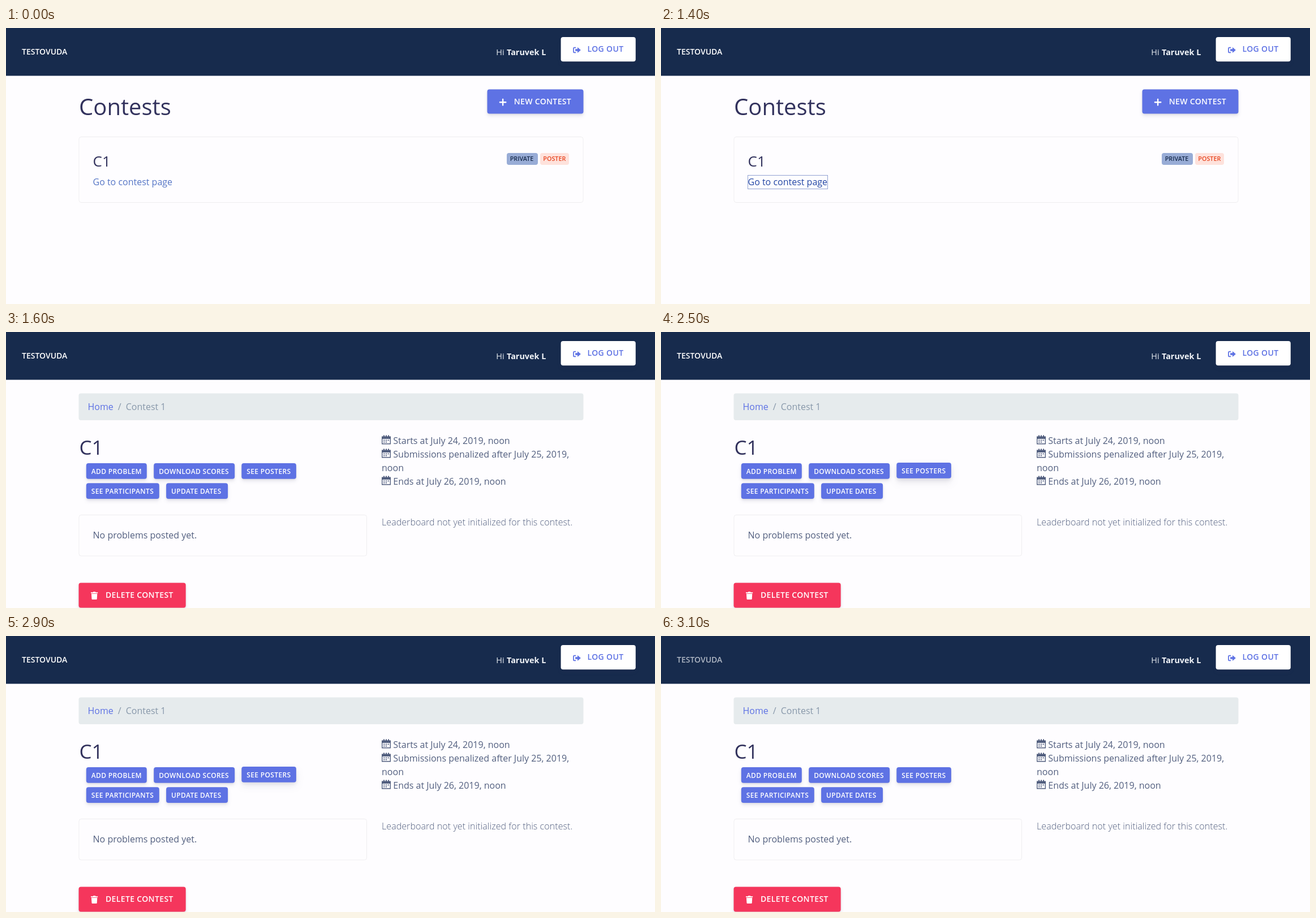
An HTML page for the animation above (4 s loop, 1147 px wide and 488 px high).

```html
<!DOCTYPE html>
<html lang="en">
<head>
<meta charset="utf-8">
<title>Contests</title>
<style>
  html, body { margin: 0; width: 100%; height: 100%; overflow: hidden; background: #fefdff; }
  svg { display: block; width: 1147px; height: 488px; }
  text { font-family: "Open Sans", sans-serif; white-space: pre; }
  .button { filter: drop-shadow(0 4px 3px rgba(50, 50, 93, .11)) drop-shadow(0 1px 1.5px rgba(0, 0, 0, .08)); }
  .label { font-weight: 600; letter-spacing: .35px; }
  .light { font-weight: 300; letter-spacing: .07px; }
</style>
</head>
<body>
<svg id="stage" viewBox="0 0 1147 488"></svg>
<script>
const INK = '#32325d', BODY = '#525f7f', BLUE = '#5e72e4', MUTED = '#8898aa', RED = '#f5365c';

const box = (x, y, w, h, fill, attrs = '') =>
  `<rect x="${x}" y="${y}" width="${w}" height="${h}" rx="4" fill="${fill}" ${attrs}/>`;

const card = (x, y, w, h) =>
  box(x + .5, y + .5, w - 1, h - 1, 'none', 'stroke="#000" stroke-opacity=".06"');

const text = (x, y, size, fill, content, attrs = '') =>
  `<text x="${x}" y="${y}" font-size="${size}" fill="${fill}" ${attrs}>${content}</text>`;

const bold = 'font-weight="600"';

const bigButton = (x, y, w, h, label, labelX, baseline, color, fill, icon) =>
  box(x, y, w, h, fill, 'class="button"') +
  text(labelX, baseline, 14, color, label, 'class="label"') +
  `<g transform="translate(${x + 21.5} ${baseline - 10})" color="${color}" fill="${color}">${icon}</g>`;

const smallButton = (x, y, w, label, id = '') =>
  `<g id="${id}">${box(x, y, w, 27.8, BLUE, 'class="button"')}
  ${text(x + 9, Math.floor(y) + 18.5, 12, '#fff', label, 'class="label"')}</g>`;

const calendar = y => `<g transform="translate(664 ${y})" fill="${BODY}">
  <path d="M0 2H3V0H5V2H7V0H9V2H11V0H13V2H16V16H0ZM1.4 6.4V14.6H14.6V6.4Z" fill-rule="evenodd"/>
  <path d="M3.2 8.8H12.8M3.2 12.2H9" stroke="${BODY}" stroke-width="1.8" stroke-dasharray="2.2 1.5"/></g>`;

const exitIcon = `<path d="M4 5.2H7.9V2.1L13.8 7 7.9 11.9V8.8H4Z"/>
  <path d="M5.2 2.6H2.6Q.9 2.6.9 4.3V9.7Q.9 11.4 2.6 11.4H5.2" fill="none" stroke="currentColor" stroke-width="1.75"/>`;
const plusIcon = '<path d="M6.1 1V11.4M.9 6.2H11.3" stroke="currentColor" stroke-width="2.4" stroke-linecap="round"/>';
const trashIcon = '<path d="M0 .2H3.6L4.3-.7H7.9L8.6.2H12.2V2H0ZM.9 2.8H11.3L10.7 12Q10.6 13 9.6 13H2.6Q1.6 13 1.5 12Z"/>';

const header =
  '<rect width="1147" height="84.5" fill="#172b4d"/>' +
  bigButton(980.6, 16, 132.2, 43.3, 'LOG OUT', 1027.5, 42, BLUE, '#fff', exitIcon) +
  text(28, 47, 14, '#fff', 'TESTOVUDA', bold + ' id="brand"') +
  text(866.3, 48, 14.4, '#e6eaf0', 'Hi') +
  text(885, 48, 14.4, '#f1f4f8', 'Taruvek L', 'font-weight="700"');

const contestList =
  text(129, 154, 40, INK, 'Contests') +
  bigButton(850.5, 108.5, 170, 43, 'NEW CONTEST', 897.7, 135, '#fff', BLUE, plusIcon) +
  card(128.5, 192, 892, 117) +
  text(153.5, 245, 26, INK, 'C1') +
  text(153.5, 278, 16, '', 'Go to contest page', 'id="link"') +
  '<rect id="outline" x="153.5" y="260.5" width="141" height="24" fill="none" stroke="#2447a5" stroke-dasharray="1"/>' +
  box(885, 221, 55, 21, '#98acd6') +
  text(890.7, 235, 10.8, '#172b4d', 'PRIVATE', bold) +
  box(944, 221, 51, 21, '#fee2dc') +
  text(949.3, 235, 10.8, '#e8451f', 'POSTER', bold);

const contestPage =
  box(128.5, 108.5, 892, 47.5, '#e6ebed') +
  text(144.5, 138, 16, BLUE, 'Home') +
  text(197.8, 138, 16, MUTED, '/') +
  text(211.7, 138, 16, MUTED, 'Contest 1') +
  text(129.5, 217, 35, INK, 'C1') +
  smallButton(141.8, 232, 107, 'ADD PROBLEM') +
  smallButton(261.2, 232, 143, 'DOWNLOAD SCORES', 'scores') +
  smallButton(416.3, 232, 96.6, 'SEE POSTERS', 'posters') +
  smallButton(141.8, 267.3, 129, 'SEE PARTICIPANTS') +
  smallButton(283.1, 267.3, 109, 'UPDATE DATES') +
  card(128.5, 323, 509.5, 73.5) +
  text(153.5, 365, 16, BODY, 'No problems posted yet.') +
  [182.5, 206.5, 254.5].map(calendar).join('') +
  text(684.3, 198, 16, BODY, 'Starts at July 24, 2019, noon') +
  text(684.3, 222, 16, BODY, 'Submissions penalized after July 25, 2019,') +
  text(664, 246, 16, BODY, 'noon') +
  text(684.3, 270, 16, BODY, 'Ends at July 26, 2019, noon') +
  text(664, 342, 16, BODY, 'Leaderboard not yet initialized for this contest.', 'class="light"') +
  bigButton(128.5, 443.6, 189.2, 44, 'DELETE CONTEST', 176, 470, '#fff', RED, trashIcon);

const $ = id => document.getElementById(id);
$('stage').innerHTML = `${header}<g id="list">${contestList}</g><g id="contest">${contestPage}</g>`;

const show = (id, on) => { $(id).style.display = on ? '' : 'none'; };
const ramp = (t, start) => Math.min(1, Math.max(0, (t - start) / 150));

// Raise a button and deepen its shadow by an amount from 0 to 1.
function lift(id, k) {
  const mix = (a, b) => a + (b - a) * k;
  $(id).setAttribute('transform', `translate(0 ${-Math.round(k)})`);
  $(id).firstElementChild.style.filter =
    `drop-shadow(0 ${mix(4, 7)}px ${mix(3, 7)}px rgba(50,50,93,${mix(.11, .1)})) ` +
    `drop-shadow(0 ${mix(1, 3)}px ${mix(1.5, 3)}px rgba(0,0,0,.08))`;
}

function render(now) {
  const t = Math.floor(now % 4000 / 100) * 100;
  show('list', t < 1600);
  show('outline', t >= 1400);
  show('contest', t >= 1600);
  $('link').style.fill = t < 400 ? '#5676c6' : '#2447a5';
  $('brand').style.fill = t < 3100 ? '#fff' : '#aeb6c3';
  lift('scores', Math.min(ramp(t, 2250), 1 - ramp(t, 2330)));
  lift('posters', Math.min(ramp(t, 2350), 1 - ramp(t, 2870)));
}

const start = performance.now();
function tick() {
  render(performance.now() - start);
  requestAnimationFrame(tick);
}
tick();
</script>
</body>
</html>
```
